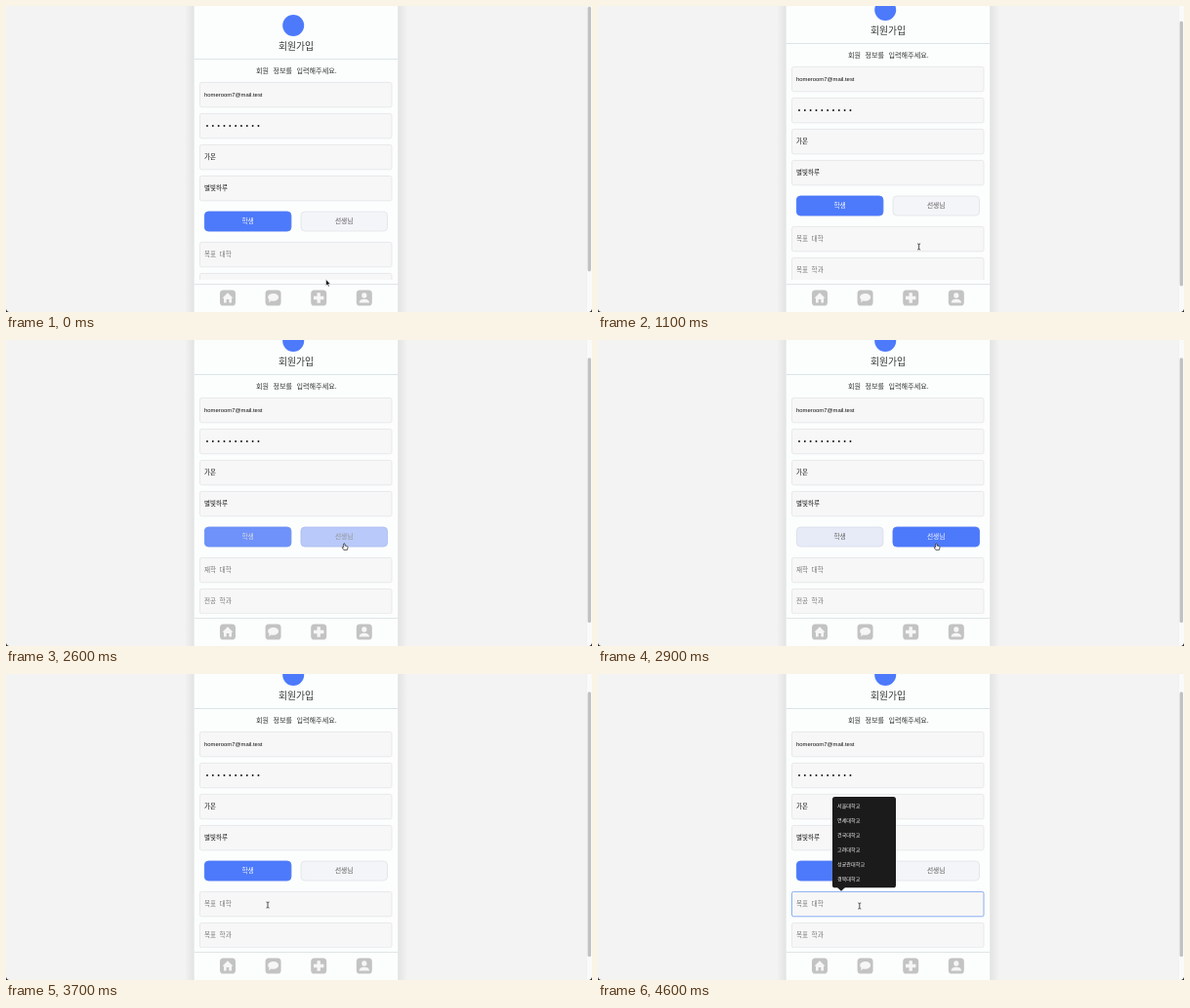
An HTML page that plays this animation: 600 by 314 pixels, repeating every 5000 ms.

```html
<!DOCTYPE html>
<html lang="ko">
<head>
<meta charset="utf-8">
<title>회원가입</title>
<style>
  html, body { margin: 0; width: 100%; height: 100%; overflow: hidden; background: #f3f3f3; }
  svg { display: block; width: 600px; height: 314px; }
  text { font-family: "Noto Sans CJK KR", "Noto Sans CJK", sans-serif; word-spacing: 1.6px; }
  .latin { font-family: "Liberation Sans", Arial, sans-serif; }
</style>
</head>
<body>
<svg id="stage" viewBox="0 0 600 314">
  <defs>
    <linearGradient id="shade">
      <stop offset="0" stop-color="#000" stop-opacity="0"/>
      <stop offset="1" stop-color="#000" stop-opacity=".07"/>
    </linearGradient>
    <clipPath id="view"><rect x="193" width="208" height="281"/></clipPath>
  </defs>
  <rect width="600" height="314" fill="#f3f3f3"/>
  <rect x="183" width="10" height="314" fill="url(#shade)"/>
  <rect x="183" width="10" height="314" fill="url(#shade)" transform="matrix(-1 0 0 1 594 0)"/>
  <rect x="192.7" width="208.5" height="314" fill="#fcfefe"/>
  <g clip-path="url(#view)"><g id="page"></g></g>
  <g id="nav"></g>
  <rect x="594" width="6" height="314" fill="#fafafa"/>
  <rect x="594" width=".5" height="314" fill="#e8e8e8"/>
  <rect id="thumb" x="595.6" y="0.5" width="3.4" height="272" rx="1.7" fill="#c1c1c1"/>
  <path d="M0 310.5Q.3 313.7 3.5 314H0ZM600 310.5Q599.7 313.7 596.5 314H600Z" fill="#222"/>
  <g id="popup"></g>
  <g id="pointer"></g>
</svg>
<script>
const LOOP = 5000, FRAME = 100;
const BLUE = '#4d7afb';
const $ = id => document.getElementById(id);

function add(parent, tag, attrs, content) {
  const el = document.createElementNS('http://www.w3.org/2000/svg', tag);
  for (const key in attrs) el.setAttribute(key, attrs[key]);
  if (content) el.textContent = content;
  parent.append(el);
  return el;
}

// y is the visual middle of the line
function label(parent, content, x, y, size, fill, more = {}) {
  return add(parent, 'text', { x, y: y + size * 0.37, 'font-size': size, fill, ...more }, content);
}

function box(parent, x, y, width, height, rx, fill, stroke = 'none') {
  return add(parent, 'rect', { x, y, width, height, rx, fill, stroke, 'stroke-width': 0.8 });
}

const page = $('page');
const middle = { 'text-anchor': 'middle' };

add(page, 'circle', { cx: 294.2, cy: 20, r: 11, fill: BLUE });
label(page, '회원가입', 297, 41, 9.8, '#333', { ...middle, 'font-weight': 300 });
add(page, 'path', { d: 'M193 54.5H401', stroke: '#d9e2e4', 'stroke-width': 0.9 });
label(page, '회원 정보를 입력해주세요.', 297.3, 66, 7.1, '#333', { ...middle, style: 'word-spacing:2.5px' });

const fields = [78, 110, 142, 174, 242, 274].map(y => box(page, 198.5, y + 0.4, 196.5, 25.4, 1.8, '#f7f7f7', '#e4e5e6'));
label(page, 'homeroom7@mail.test', 203, 91, 5.92, '#111', { class: 'latin' });
for (let i = 0; i < 10; i++) add(page, 'circle', { cx: 206 + i * 5.83, cy: 123, r: 0.95, fill: '#111' });
label(page, '가온', 203, 155, 6.5, '#111', { 'font-weight': 500 });
label(page, '별빛하루', 203, 187, 6.5, '#111', { 'font-weight': 500 });

function toggle(x, name) {
  box(page, x, 211, 88.5, 20, 4, '#f4f5f8', '#e1e3e8');
  label(page, name, x + 44.2, 220.5, 6.7, '#555', middle);
  const on = add(page, 'g', {});
  box(on, x, 211, 88.5, 20, 4, BLUE, BLUE);
  label(on, name, x + 44.2, 220.5, 6.7, '#fff', middle);
  return on;
}
const student = toggle(203.4, '학생');
const teacher = toggle(302, '선생님');
const school = label(page, '목표 대학', 203, 255, 6.6, '#757575');
const major = label(page, '목표 학과', 203, 287, 6.6, '#757575');

// bottom bar
const nav = $('nav');
add(nav, 'path', { d: 'M193 285.5H401', stroke: '#dce2e3', 'stroke-width': 0.9 });
const icons = [
  'M-5.5 .2L0-5.2 5.5 .2H4V5H1.3V1.4H-1.3V5H-4V.2Z',
  'M0-4.5C7.4-4.5 7.4 3.3 0 3.3Q-1.2 3.3-2 3L-4.6 4.8-4 2C-7-.5-5-4.5 0-4.5Z',
  'M-1.7-5.2H1.7V-1.7H5.2V1.7H1.7V5.2H-1.7V1.7H-5.2V-1.7H-1.7Z',
  'M0-5.2A2.6 2.7 0 0 1 0 .2 2.6 2.7 0 0 1 0-5.2ZM-5.3 5Q-5 1.2 0 1.2T5.3 5Z'
];
icons.forEach((d, i) => {
  const icon = add(nav, 'g', { transform: `translate(${227 + i * 46.6} 299.5)` });
  box(icon, -8, -8, 16, 16, 3.6, '#c3c3c3');
  add(icon, 'path', { d, fill: '#f6f6f6' });
});

// suggestion list
const popup = $('popup');
box(popup, 240, 126, 65, 93.3, 2.6, '#1b1b1b');
add(popup, 'path', { d: 'M245 219L249 222.8 253 219Z', fill: '#1b1b1b' });
['서울대학교', '연세대학교', '건국대학교', '고려대학교', '성균관대학교', '경북대학교'].forEach((name, i) =>
  label(popup, name, 245, 135 + i * 15, 5.1, '#f4f4f4', { 'font-weight': 500 }));

// pointer shapes, each around its own hot spot
const pointer = $('pointer');
const shapes = {
  arrow: add(pointer, 'path', { d: 'M0 0V6.4L1.5 5.1 2.5 7.3 3.5 6.8 2.6 4.7H4.5Z', fill: '#111', stroke: '#fff', 'stroke-width': 0.5 }),
  beam: add(pointer, 'path', { d: 'M-1.5-3Q0-3 0-2.3 0-3 1.5-3M0-2.4V2.4M-1.5 3Q0 3 0 2.3 0 3 1.5 3', fill: 'none', stroke: '#333', 'stroke-width': 0.85 }),
  hand: add(pointer, 'path', { d: 'M-1.3-2.6Q-.6-3.4 0-2.6V-.6L2.3 0Q3.2.3 3 1.3L2.4 3.8H-1.2L-3 1.2Q-2.8.2-1.3 1.2Z', fill: '#fff', stroke: '#222', 'stroke-width': 0.7 })
};

// rows: time, then values
const scrollKeys = [[900, 0], [1000, 8], [1100, 16], [1200, 18], [1300, 18.6], [1500, 19]];
const studentKeys = [[2500, 1], [2600, 0.8], [2700, 0.45], [2800, 0.18], [2900, 0.07], [3000, 0], [3300, 0], [3400, 0.6], [3600, 1]];
const teacherKeys = [[2500, 0], [2600, 0.35], [2700, 0.75], [2850, 1], [3300, 1], [3400, 0.4], [3600, 0]];
const pointerKeys = [
  [300, 327.6, 280.6], [500, 327.8, 273], [700, 328.2, 257], [900, 328.6, 247],
  [1700, 328.6, 247], [1800, 330.5, 240], [1900, 334.5, 230], [2000, 340, 220], [2100, 344.5, 214], [2300, 347, 211.6],
  [3000, 347, 211.6], [3100, 327, 208], [3200, 284, 206], [3300, 263, 207], [3400, 261, 209],
  [3500, 263, 218], [3600, 267, 230], [3700, 268, 237], [3900, 267.8, 238]
];
const shapeKeys = [[0, 'arrow'], [600, 'beam'], [2000, 'arrow'], [2100, 'hand'], [3100, 'arrow'], [3200, 'hand'], [3500, 'arrow'], [3600, 'beam']];

function at(keys, t) {
  const next = keys.findIndex(k => k[0] > t);
  if (next === 0) return keys[0].slice(1);
  if (next < 0) return keys[keys.length - 1].slice(1);
  const a = keys[next - 1], b = keys[next];
  const p = (t - a[0]) / (b[0] - a[0]);
  return a.slice(1).map((v, i) => v + (b[i + 1] - v) * p);
}

function draw(t) {
  const [y] = at(scrollKeys, t);
  page.setAttribute('transform', `translate(0 ${-y})`);
  $('thumb').setAttribute('y', 0.5 + y * 0.93);

  student.setAttribute('opacity', at(studentKeys, t)[0]);
  teacher.setAttribute('opacity', at(teacherKeys, t)[0]);
  const teaching = t >= 2500 && t < 3300;
  school.textContent = teaching ? '재학 대학' : '목표 대학';
  major.textContent = teaching ? '전공 학과' : '목표 학과';

  fields[4].setAttribute('stroke', t >= 3800 ? '#6f9bf0' : '#e4e5e6');
  popup.setAttribute('visibility', t >= 3900 ? 'visible' : 'hidden');

  pointer.setAttribute('transform', `translate(${at(pointerKeys, t)})`);
  const shape = shapeKeys.filter(k => k[0] <= t).pop()[1];
  for (const name in shapes) shapes[name].setAttribute('visibility', name === shape ? 'visible' : 'hidden');
}

const start = performance.now();
function tick() {
  const t = (performance.now() - start) % LOOP;
  draw(Math.floor(t / FRAME) * FRAME);
  requestAnimationFrame(tick);
}
tick();
</script>
</body>
</html>
```
